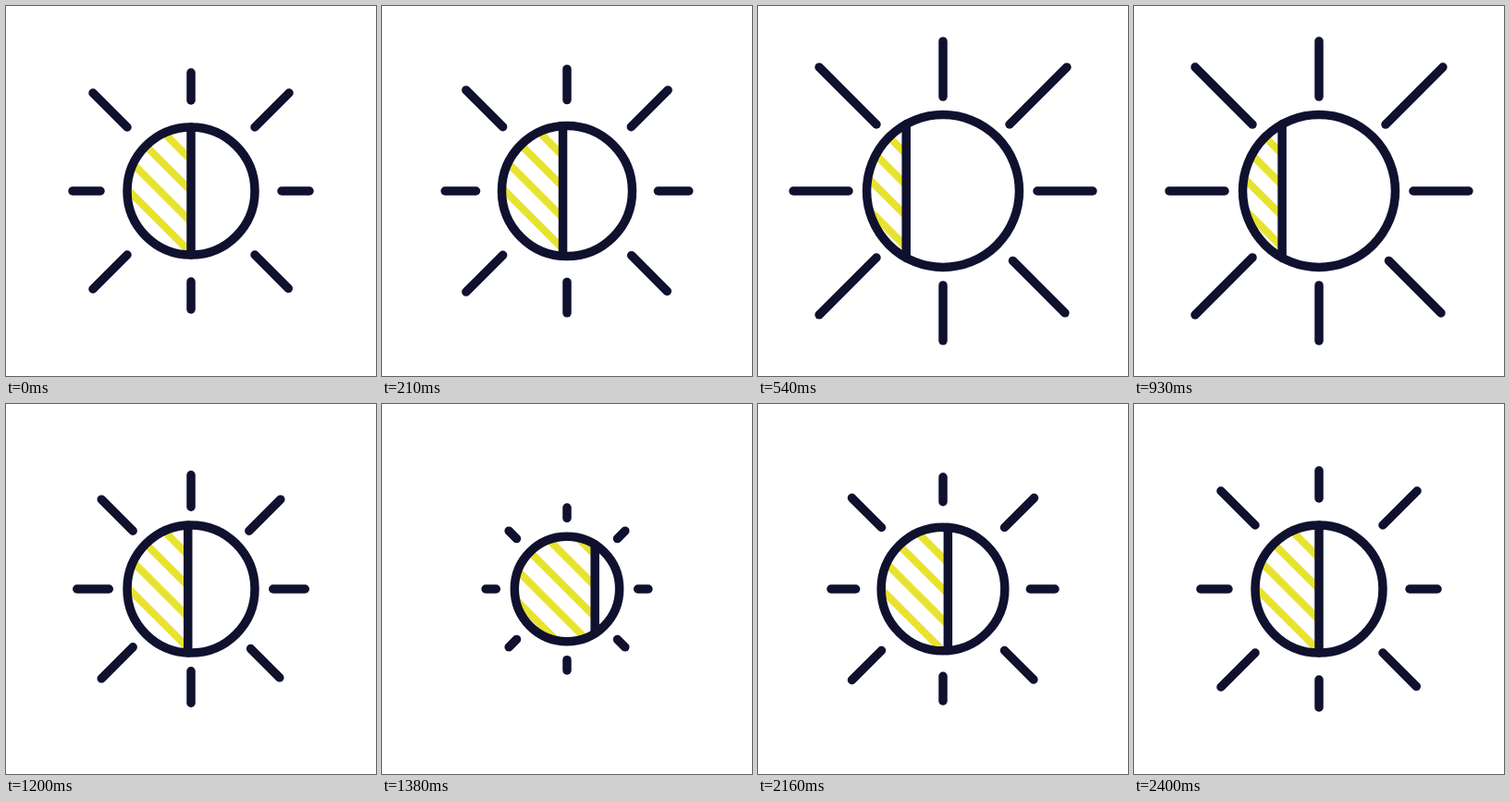
An HTML page with a canvas that plays this animation: 400 px wide and 400 px high, repeating every 2430 ms.

```html
<!DOCTYPE html>
<html>
<head>
<meta charset="utf-8">
<style>
html, body { margin: 0; height: 100%; overflow: hidden; background: #fff; }
canvas { display: block; width: 100vmin; height: 100vmin; }
</style>
</head>
<body>
<canvas width="400" height="400"></canvas>
<script>
const ctx = document.querySelector('canvas').getContext('2d');
const LOOP = 2430, MOVE = 600, NAVY = '#10112f', YELLOW = '#e8e331';

// Distances from the centre: circle radius, divider x, then inner and outer
// ends of the straight rays, the diagonal rays and the lower right ray.
const medium = [69, 0, 98, 128, 69, 106, 69, 105.3];
const large = [82.5, -40, 102, 162, 72, 134, 75.5, 132];
const small = [56, 32, 76, 86, 54, 61, 54, 61];
const moves = [[0, medium, large], [900, large, small], [1800, small, medium]];

// cubic-bezier(.833, 0, .167, 1), solved by bisection
function ease(x) {
  let lo = 0, hi = 1, s = x;
  for (let i = 0; i < 24; i++) {
    s = (lo + hi) / 2;
    const bx = 3 * (1 - s) * s * ((1 - s) * 0.833 + s * 0.167) + s ** 3;
    if (bx < x) lo = s; else hi = s;
  }
  return s * s * (3 - 2 * s);
}

function poseAt(t) {
  const [start, from, to] = moves.findLast(move => move[0] <= t);
  const p = t >= start + MOVE ? 1 : ease((t - start) / MOVE);
  return from.map((v, i) => v + (to[i] - v) * p);
}

function line(x1, y1, x2, y2) {
  ctx.beginPath();
  ctx.moveTo(x1, y1);
  ctx.lineTo(x2, y2);
  ctx.stroke();
}

function draw(t) {
  const [r, x, near, far, diagNear, diagFar, lowNear, lowFar] = poseAt(t);
  ctx.setTransform(1, 0, 0, 1, 0, 0);
  ctx.fillStyle = '#fff';
  ctx.fillRect(0, 0, 400, 400);
  ctx.translate(200, 200);
  ctx.lineCap = 'round';

  // Stripes fill the circle left of the divider
  ctx.save();
  ctx.beginPath();
  ctx.rect(-100, -100, 100 + x, 200);
  ctx.clip();
  ctx.beginPath();
  ctx.arc(0, 0, r, 0, 2 * Math.PI);
  ctx.clip();
  ctx.strokeStyle = YELLOW;
  ctx.lineWidth = 8;
  for (let k = -4; k <= 4; k++) line(-150, k * 33.5 - 150, 150, k * 33.5 + 150);
  ctx.restore();

  ctx.strokeStyle = NAVY;
  ctx.lineWidth = 9.5;
  ctx.beginPath();
  ctx.arc(0, 0, r, 0, 2 * Math.PI);
  ctx.stroke();
  const half = Math.sqrt(r * r - x * x);
  line(x, -half, x, half);

  for (const [dx, dy] of [[1, 0], [-1, 0], [0, 1], [0, -1]])
    line(dx * near, dy * near, dx * far, dy * far);
  for (const [dx, dy] of [[1, -1], [-1, -1], [-1, 1]])
    line(dx * diagNear, dy * diagNear, dx * diagFar, dy * diagFar);
  line(lowNear, lowNear, lowFar, lowFar);
}

function tick() {
  draw(performance.now() % LOOP);
  requestAnimationFrame(tick);
}
tick();
</script>
</body>
</html>
```
